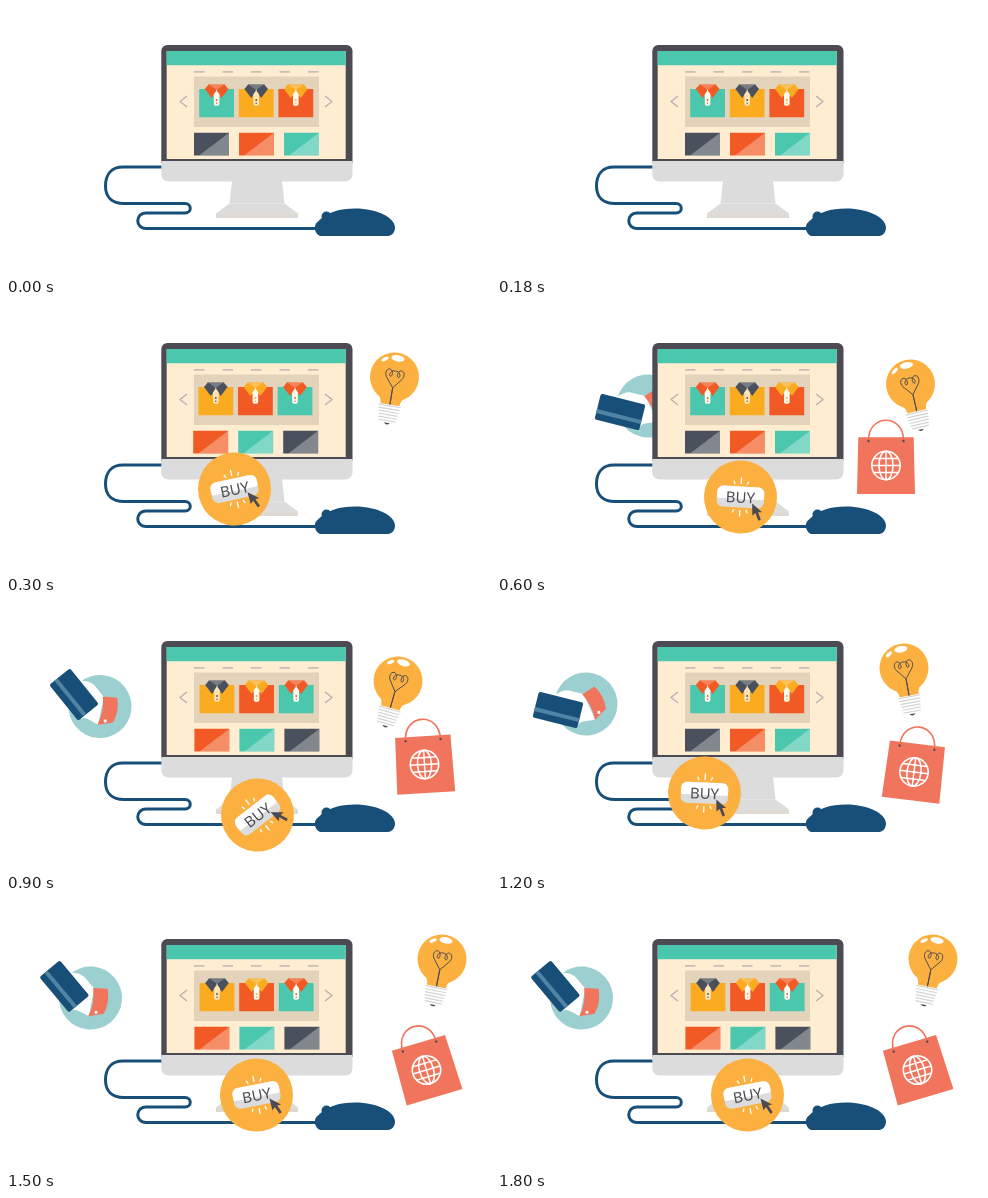
Recreate the animation shown at these times as an HTML page with a canvas. Size 485x270 px, loop 2000 ms.

```html
<!DOCTYPE html>
<html lang="en">
<head>
<meta charset="utf-8">
<title>Online shopping</title>
<style>
html, body { margin: 0; width: 100%; height: 100%; overflow: hidden; background: #fff; }
canvas { display: block; width: 485px; height: 270px; }
</style>
</head>
<body>
<canvas id="stage"></canvas>
<script>
const W = 485, H = 270, LOOP = 2000, STEP = 300;
const canvas = document.getElementById('stage');
const ctx = canvas.getContext('2d');
const ratio = window.devicePixelRatio || 1;
canvas.width = W * ratio;
canvas.height = H * ratio;

const DARK = '#4c4b54', TEAL = '#4bc7ae', RED = '#f15a24', AMBER = '#fbab20';
const NAVY = '#184f78', GREY = '#dcdcdc', ORANGE = '#fbb040', CORAL = '#f0755c', CREAM = '#ffedd2';
const SLATE = '#4a515c';

// One pose per step: x, y, degrees; null means off stage
const poses = {
  hand: [null, null, [151, 102, 14], [94, 104.5, 51], [89, 102, 14], [84.5, 98, 50]],
  bulb: [null, [388.5, 73, 9.5], [413.5, 80, -13], [392, 79, 16], [407, 66, -10.5], [436, 59, 11.5]],
  bag: [null, null, [389, 161.5, 0], [418.5, 162.5, -3.5], [417, 170, 7], [420.5, 170, -16.5]],
  buy: [null, [228.5, 185, -12], [243.5, 193, 3], [251.5, 213, -38], [207.5, 191, 2.5], [250.5, 195, -11]]
};

function fill(path, color) {
  ctx.fillStyle = color;
  ctx.fill(new Path2D(path));
}
function line(path, color, width) {
  ctx.strokeStyle = color;
  ctx.lineWidth = width;
  ctx.stroke(new Path2D(path));
}
function box(x, y, w, h, color, r = 0) {
  ctx.fillStyle = color;
  ctx.beginPath();
  ctx.roundRect(x, y, w, h, r);
  ctx.fill();
}
function oval(x, y, rx, ry, color, deg = 0) {
  ctx.fillStyle = color;
  ctx.beginPath();
  ctx.ellipse(x, y, rx, ry, deg * Math.PI / 180, 0, 7);
  ctx.fill();
}
const disc = (x, y, r, color) => oval(x, y, r, r, color);

function place(pose, draw) {
  if (!pose) return;
  ctx.save();
  ctx.translate(pose[0], pose[1]);
  ctx.rotate(pose[2] * Math.PI / 180);
  draw();
  ctx.restore();
}

function hand() {
  disc(0, 0, 31.5, '#9ccfd0');
  fill('M-5 -9 L-20 -9 Q-27 -8 -33 0 L-3 25 Q-3 19 3 17 L13 13 Z', '#fff');
  fill('M-6 -8.5 L4 -19 Q16 -12 20.5 0 L12.5 13.5 Q7 0 -6 -8.5 Z', CORAL);
  disc(14.5, 5, 1.6, '#fff');
  box(-48.7, -0.7, 46, 26.6, NAVY, 2);
  box(-48.7, 15.3, 46, 4, '#5084a5');
}

function cableAndMouse() {
  line('M156 161 H117 C105 161 99.5 169 99.5 180 C99.5 191 106 197.5 118 197.5 H179 C186 197.5 186 207 179 207 H140 C129 207 129 222.5 140 222.5 H318', NAVY, 3);
  fill('M314 230 C308 227 307 219 312 215.500 C321 206 334 202.500 349 202.500 C372 202.500 389 212 389 221.500 C389 226 386 230 382 230 Z', NAVY);
  disc(320.5, 210.5, 5, NAVY);
}

function shirt(x, body, collar) {
  box(x - 17.4, 83, 34.8, 28.2, body);
  ctx.save();
  ctx.translate(x, 0);
  const white = body === AMBER ? '#fde3b5' : '#fff8ee';
  fill('M-8.500 78.500 H8.500 L0 87 Z', collar);
  fill('M-7 79 H7 L0 84 Z', 'rgba(255,255,255,.25)');
  fill('M0 83.500 L4 88.500 L2.800 90 V98 Q2.800 99.800 1 99.800 H-1 Q-2.800 99.800 -2.800 98 V90 L-4 88.500 Z', white);
  for (const s of [-1, 1]) {
    ctx.save();
    ctx.scale(s, 1);
    fill('M8 78.500 L11.800 83 L5 92 L0 85 Z', collar);
    ctx.restore();
  }
  fill('M0 84.500 L3 88.500 L0 91.500 L-3 88.500 Z', white);
  disc(0, 94, 0.9, collar);
  disc(0, 97.2, 0.7, collar);
  ctx.restore();
}

function tile(x, color) {
  box(x, 126.8, 35, 22.6, color);
  fill(`M${x + 5} 149.400 L${x + 35} 126.800 V149.400 Z`, 'rgba(255,255,255,.31)');
}

function monitor(step) {
  fill('M226 175 H276 L278.500 197.500 H223.500 Z', GREY);
  fill('M223.500 197.500 H278.500 L292 207.500 H210 Z', GREY);
  box(210, 207.3, 82, 4.7, '#ded9d3');
  box(155.3, 39, 191.2, 118, DARK, [6, 6, 0, 0]);
  box(155.3, 155, 191.2, 20.5, GREY, [0, 0, 7, 7]);
  box(160.7, 45, 179, 108, CREAM);
  box(160.7, 45, 179, 14.3, TEAL);
  for (let i = 0; i < 5; i++) box(188 + i * 28.5, 65.2, 10.5, 1.4, '#b9b5b1');
  box(188, 70.5, 125, 50.5, '#e3d3bb');
  line('M181 90 L174 95.500 L181 101 M319 90 L326 95.500 L319 101', '#b7b2af', 1.4);

  const odd = step % 2;
  const dx = step === 1 ? -0.8 : odd * 0.4;
  const bodies = odd ? [AMBER, RED, TEAL] : [TEAL, AMBER, RED];
  const collars = odd ? [SLATE, AMBER, RED] : [RED, SLATE, AMBER];
  const tiles = odd ? [RED, TEAL, SLATE] : [SLATE, RED, TEAL];
  for (let i = 0; i < 3; i++) {
    shirt(210.6 + i * 39.6 + dx, bodies[i], collars[i]);
    tile(188 + i * 45 + dx, tiles[i]);
  }
}

function bulb() {
  disc(0, 0, 24.5, ORANGE);
  fill('M-15 18 Q-9.500 22 -9.500 29 H9.500 Q9.500 22 15 18 Z', ORANGE);
  oval(0.3, -19, 6.6, 3.2, '#fff');
  oval(-12.3, -16.2, 3.9, 1.7, '#fff', -35);
  for (const s of [-1, 1]) {
    ctx.save();
    ctx.scale(s, 1);
    line('M0 29 V11 L8 1 C11 -4 8 -8 5 -7 C2 -6 2 0 4 0 C6.500 0 5 -7 0 -6', DARK, 0.9);
    ctx.restore();
  }
  box(-11.3, 28, 22.6, 17, '#fff', [1, 1, 6, 6]);
  for (let i = 0; i < 6; i++) {
    const half = 11.2 - i * 0.5;
    line(`M${-half} ${29.3 + i * 3} H${half}`, '#d4d4d4', 1.2);
  }
  fill('M-3 46.500 H3 Q0 50 -3 46.500 Z', DARK);
}

function bag() {
  line('M-17.500 -25 C-17.500 -52 17.500 -52 17.500 -25', CORAL, 1.6);
  fill('M-27.700 -28.300 H27.700 L29 28.500 H-29 Z', CORAL);
  disc(-17.5, -24.5, 1.2, DARK);
  disc(17.5, -24.5, 1.2, DARK);
  ctx.strokeStyle = '#fff';
  ctx.lineWidth = 1.6;
  for (const rx of [14.2, 7]) {
    ctx.beginPath();
    ctx.ellipse(0, 0, rx, 14.2, 0, 0, 7);
    ctx.stroke();
  }
  line('M0 -14 V14 M-14 0 H14 M-12 -7 H12 M-12 7 H12', '#fff', 1.5);
}

function buy() {
  disc(0, 0, 36.5, ORANGE);
  for (const s of [-1, 1]) {
    line(`M-7.500 ${s * 16} L-6 ${s * 12.5} M0 ${s * 19.5} V${s * 13} M7.500 ${s * 16} L6 ${s * 12.5}`, '#fff', 1.3);
  }
  box(-23.6, -10.5, 47.2, 21, GREY, 6);
  box(-23.6, -10.5, 47.2, 12.5, '#fff', [6, 6, 2, 2]);
  ctx.fillStyle = DARK;
  ctx.font = 'extra-condensed 15px "Noto Sans", "Open Sans", Roboto, sans-serif';
  ctx.textAlign = 'center';
  ctx.textBaseline = 'alphabetic';
  ctx.fillText('BUY', 0, 5.8);
  fill('M12 6 L12.800 18 L15.800 15.300 L19 22.800 L21.500 21.700 L18.300 14.300 L22.300 14 Z', DARK);
}

function draw(time) {
  const step = Math.min(5, Math.floor((time % LOOP) / STEP));
  ctx.setTransform(ratio, 0, 0, ratio, 0, 0);
  ctx.fillStyle = '#fff';
  ctx.fillRect(0, 0, W, H);
  ctx.lineJoin = 'round';
  place(poses.hand[step], hand);
  cableAndMouse();
  monitor(step);
  place(poses.bulb[step], bulb);
  place(poses.bag[step], bag);
  place(poses.buy[step], buy);
}

function tick() {
  draw(performance.now());
  requestAnimationFrame(tick);
}
tick();
</script>
</body>
</html>
```
